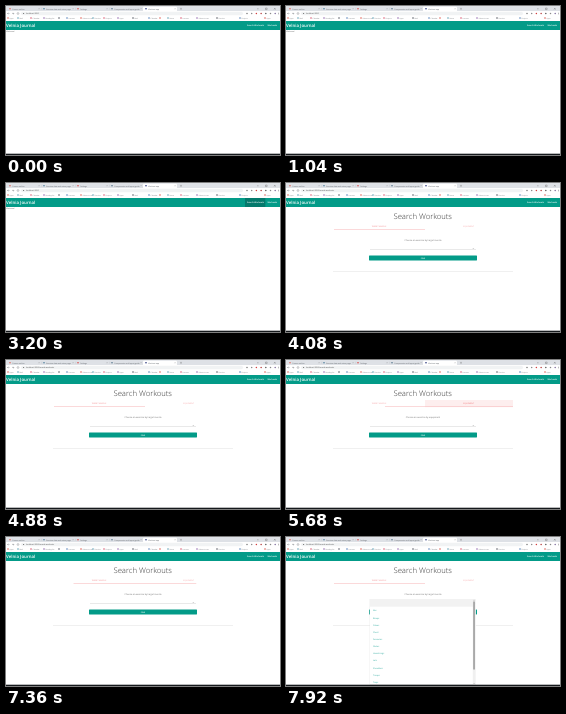
An HTML page that plays this animation: 274x149 px, repeating every 8 s.

```html
<!DOCTYPE html>
<html lang="en">
<head>
<meta charset="utf-8">
<title>Search Workouts</title>
<style>
  html, body { margin: 0; width: 100%; height: 100%; overflow: hidden; background: #fff; }
  svg { display: block; width: 100vw; height: 100vh; }
  text { font-family: "Open Sans", "Noto Sans", sans-serif; text-rendering: geometricPrecision; }
</style>
</head>
<body>
<svg id="stage" viewBox="0 0 274 149" preserveAspectRatio="none"></svg>
<script>
const LOOP = 8000;
const TEAL = '#039b88', PINK = '#ee6e73', GREY = '#70757a';
const stage = document.getElementById('stage');

function add(parent, tag, attrs) {
  const el = document.createElementNS('http://www.w3.org/2000/svg', tag);
  for (const k in attrs) el.setAttribute(k, attrs[k]);
  return parent.appendChild(el);
}
const group = (parent = stage) => add(parent, 'g', {});
const rect = (p, x, y, width, height, fill, rx = 0) => add(p, 'rect', { x, y, width, height, fill, rx });
const dot = (p, cx, cy, r, fill) => add(p, 'circle', { cx, cy, r, fill });
const path = (p, d, stroke, w = 0.35) => add(p, 'path', { d, stroke, 'stroke-width': w, fill: 'none' });
function label(p, x, y, size, fill, str, more = {}) {
  const el = add(p, 'text', { x, y, 'font-size': size, fill, ...more });
  el.textContent = str;
  return el;
}
const middle = { 'text-anchor': 'middle' };
const show = (el, on) => el.setAttribute('visibility', on ? 'visible' : 'hidden');

// Browser window
const chrome = group();
rect(chrome, 0, 0, 274, 5.2, '#dee1e6');
rect(chrome, 137, 0.7, 34, 4.8, '#fff', 1);
[
  [4, '#e06a5f', 'Course outline'],
  [38, '#4d7f9d', 'Exercise data and notes page'],
  [72, '#d94b4b', 'Settings'],
  [106, '#58768c', 'Components and layout guide'],
  [140, '#27347c', 'Workout app']
].forEach(([x, color, title]) => {
  dot(chrome, x, 2.8, 0.8, color);
  label(chrome, x + 2.3, 3.5, 1.8, '#555a60', title);
  path(chrome, `M${x + 28.6} 2.3l1 1m0 -1l-1 1`, '#777', 0.25);
  if (x < 100) path(chrome, `M${x + 31.8} 1.7v2.2`, '#a7abb0', 0.25);
});
path(chrome, 'M174 2.8h2m-1 -1v2', '#666', 0.3);
path(chrome, 'M251 2.8h1.6M259.5 2h1.6v1.6h-1.6zM268 2l1.6 1.6m0 -1.6l-1.6 1.6', '#444', 0.3);

rect(chrome, 0, 5.2, 274, 9.8, '#fff');
path(chrome, 'M3.5 7.5h-2l.8 -.8m-.8 .8l.8 .8M6 7.5h2l-.8 -.8m.8 .8l-.8 .8', '#5f6368');
add(chrome, 'circle', { cx: 12, cy: 7.5, r: 0.9, fill: 'none', stroke: '#5f6368', 'stroke-width': 0.35 });
rect(chrome, 15, 5.8, 222, 3.5, '#f1f3f4', 1.7);
dot(chrome, 17.6, 7.5, 0.6, '#666');
const url = label(chrome, 20, 8.2, 1.9, '#444', '');
['#777', '#888', '#d33f3f', '#b43a3a', '#555', '#888', '#7e6b9b'].forEach((c, i) =>
  dot(chrome, 241 + i * 4.7, 7.5, 0.75, c));
path(chrome, 'M272.5 6.7v1.7', '#555', 0.4);

const marks = ['Apps', 'Mail', 'Calendar', 'Reading list', 'Notes', 'Lessons', 'Videos to see', 'Practice', 'Projects'];
const tints = ['#db5145', '#4475b5', '#474d56', '#8b5daa', '#d74b68', '#5298b0'];
const starts = [2, 12, 25, 38, 53, 61, 75, 87, 98, 112, 127, 143, 154, 162, 175, 191, 211, 234, 259];
starts.forEach((x, i) => {
  dot(chrome, x, 12.1, 0.75, tints[i * 5 % tints.length]);
  if (x !== 53 && x !== 154) label(chrome, x + 1.6, 12.8, 1.65, GREY, marks[i % marks.length]);
});

// Page header
const nav = group();
rect(nav, 0, 15, 274, 9, TEAL);
const hover = rect(nav, 239, 15, 20.3, 9, '#04796c');
label(nav, 0, 21.2, 4.4, '#fff', 'Velnia Journal', { 'font-weight': 600 });
label(nav, 241, 20.2, 2.1, '#fff', 'Search Workouts', { 'font-weight': 600 });
label(nav, 261.4, 20.2, 2.1, '#fff', 'Workouts', { 'font-weight': 600 });

const home = group();
label(home, 0.3, 26.2, 1.8, '#555', 'Welcome !');

// Search page
const search = group();
label(search, 136.7, 36.3, 7.7, '#333', 'Search Workouts', { ...middle, 'font-weight': 300 });
const focus = rect(search, 139, 40, 88, 7.2, '#fdeeee');
const tabOne = label(search, 93, 44.3, 1.9, PINK, 'TARGET MUSCLE', middle);
const tabTwo = label(search, 182.7, 44.3, 1.9, PINK, 'EQUIPMENT', middle);
const bar = rect(search, 48, 46.2, 91, 0.5, '#f6b2b5');
const prompt = label(search, 137, 57.8, 2.2, '#666', '', middle);
rect(search, 84, 66.3, 106, 0.3, '#b5b5b5');
path(search, 'M186.6 65l.7 .8l.7 -.8', '#777', 0.3);
rect(search, 83, 72.6, 108, 4.8, TEAL, 0.4);
label(search, 137, 75.7, 1.9, '#fff', 'FIND', { ...middle, 'font-weight': 600 });
rect(search, 47, 88.1, 180, 0.3, '#ccc');

// Muscle list
const menu = group(search);
rect(menu, 83.7, 62, 106, 86, '#e4e4e4', 0.4);
rect(menu, 84, 62, 105.5, 85.5, '#fff');
rect(menu, 84, 62, 103, 7.7, '#f2f2f2');
['Abs', 'Biceps', 'Calves', 'Chest', 'Forearms', 'Glutes', 'Hamstrings', 'Lats', 'Shoulders', 'Triceps', 'Traps']
  .forEach((name, i) => label(menu, 87, 74.4 + i * 7.15, 2.1, '#26a69a', name));
rect(menu, 186.8, 62, 2.5, 85.5, '#f0f0f0');
rect(menu, 187.1, 64.5, 1.9, 68, '#a9a9a9');
path(menu, 'M187.5 63.6l.6 -.7l.6 .7M187.5 146l.6 .7l.6 -.7', '#777', 0.3);

rect(stage, 0, 147.7, 274, 1.3, '#15191c');

const T = { hover: 3000, page: 3760, second: 5490, muscle: 6640, first: 7200, menu: 7600 };
const ease = (t, from, ms) => {
  const k = Math.min(1, Math.max(0, (t - from) / ms));
  return k * (2 - k);
};

function draw(t) {
  const open = t >= T.page;
  const second = t >= T.second && t < T.first;
  url.textContent = open ? 'localhost:3000/search-workouts' : 'localhost:3000';
  show(home, !open);
  show(search, open);
  show(hover, t >= T.hover && t < T.page);

  const left = 48 + 91 * (ease(t, T.second + 90, 300) - ease(t, T.first, 300));
  const right = 139 + 88 * (ease(t, T.second, 180) - ease(t, T.first + 90, 300));
  bar.setAttribute('x', left);
  bar.setAttribute('width', Math.max(0, right - left));
  focus.setAttribute('opacity', second ? 1 : 0);
  tabOne.setAttribute('opacity', second ? 0.7 : 0.85);
  tabTwo.setAttribute('opacity', second ? 1 : 0.65);
  prompt.textContent = 'Choose an exercise by ' +
    (t >= T.second && t < T.muscle ? 'equipment' : 'target muscle');

  const grow = ease(t, T.menu, 150);
  menu.setAttribute('opacity', grow);
  menu.setAttribute('transform', `translate(0 ${62 * (1 - grow)}) scale(1 ${Math.max(grow, 0.01)})`);
}

const begin = performance.now();
function tick() {
  draw((performance.now() - begin) % LOOP);
  requestAnimationFrame(tick);
}
draw(0);
requestAnimationFrame(tick);
</script>
</body>
</html>
```
